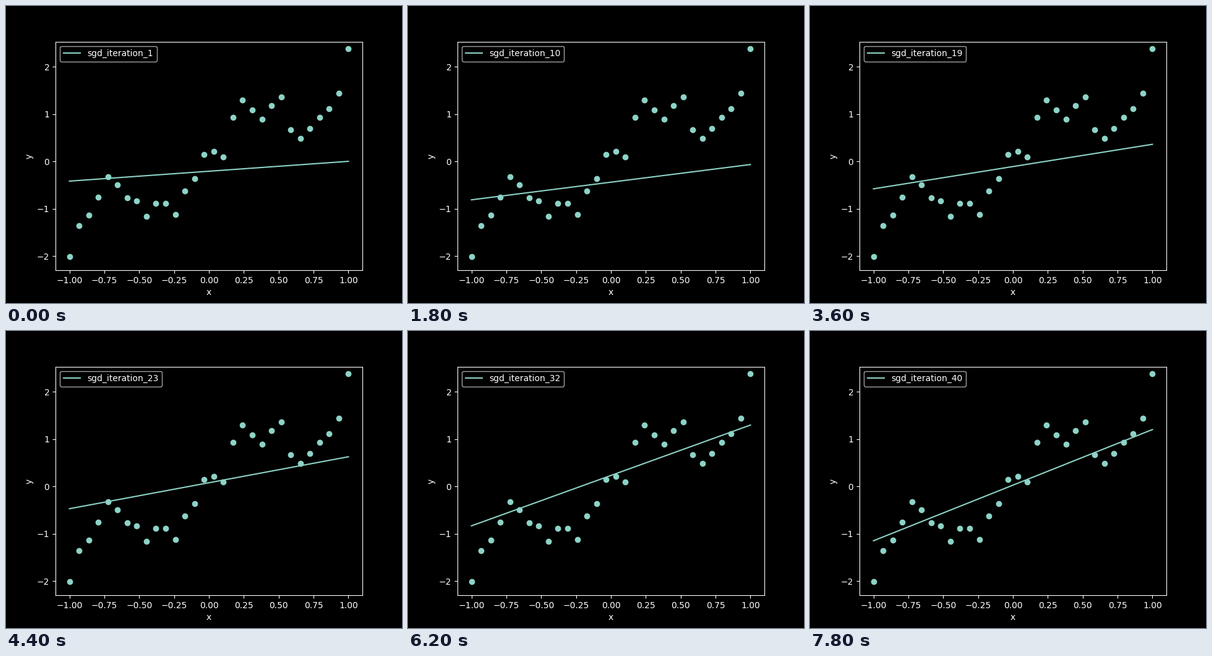
Recreate the animation shown at these times as a matplotlib script. Size 640x480 px, loop 8000 ms.

```python
import numpy as np
import matplotlib.pyplot as plt
from matplotlib.animation import FuncAnimation

STEPS = 40
INTERVAL = 200

# Line height at each end (x = -1 and x = 1), linear between key steps
KEY_STEPS = [1, 7, 14, 19, 27, 32, 40]
LEFT = [-0.415, -0.70, -0.957, -0.578, -0.362, -0.832, -1.147]
RIGHT = [0.003, -0.013, -0.133, 0.363, 0.893, 1.298, 1.203]


def wave(x):
    """Rising trend with a broad swing and finer ripples."""
    def s(k):
        return np.sin(k * np.pi * x)

    def c(k):
        return np.cos(k * np.pi * x)

    trend = 0.07 + 2.2 * x
    swing = 0.73 * s(2) - 0.29 * s(1) - 0.17 * s(3)
    ripple = 0.06 * (s(10) - s(6)) - 0.19 * s(7)
    ripple += 0.115 * c(8) + 0.065 * (c(11) + c(12))
    return trend + swing + ripple


def line_ends(step):
    return [np.interp(step, KEY_STEPS, side) for side in (LEFT, RIGHT)]


plt.style.use("dark_background")
fig, ax = plt.subplots(figsize=(6.4, 4.8), dpi=100)

x = np.linspace(-1, 1, 30)
ax.scatter(x, wave(x), color="C0")
line, = ax.plot([-1, 1], line_ends(1), color="C0", label="sgd_iteration_1")
ax.set(xlim=(-1.1, 1.1), ylim=(-2.3, 2.532), xlabel="x", ylabel="y")
legend = ax.legend(loc="upper left")


def update(i):
    step = i + 1
    line.set_ydata(line_ends(step))
    legend.get_texts()[0].set_text(f"sgd_iteration_{step}")
    return line, legend


anim = FuncAnimation(fig, update, frames=STEPS, interval=INTERVAL,
                     init_func=lambda: update(0), repeat=True, repeat_delay=0)
plt.show()
```
